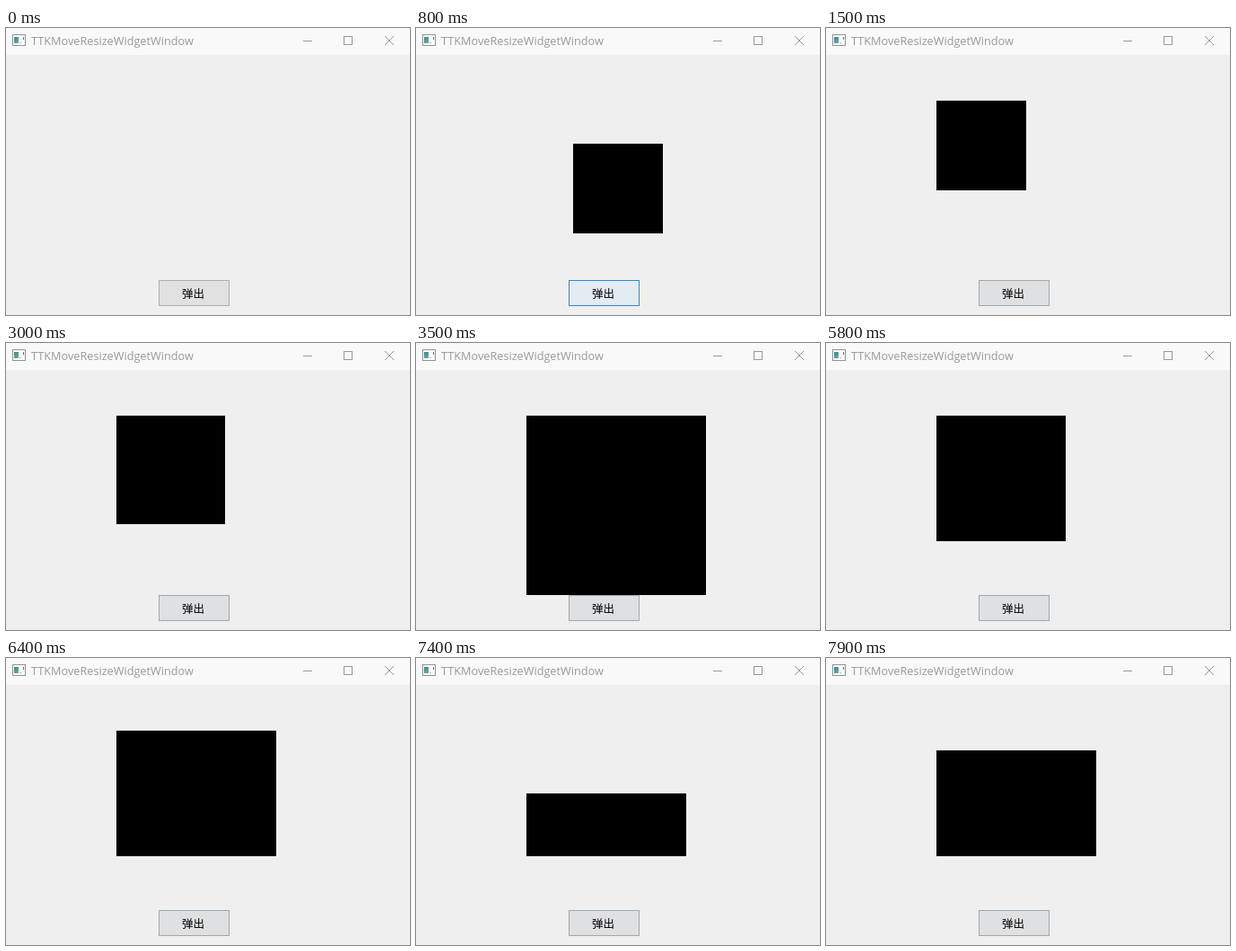
These frames come from a looping animation (450 by 320 pixels, 8000 ms). An HTML page with a canvas:

```html
<!DOCTYPE html>
<html lang="zh">
<head>
<meta charset="utf-8">
<title>TTKMoveResizeWidgetWindow</title>
<style>
  html, body { margin: 0; width: 100%; height: 100%; overflow: hidden; background: #efefef; }
  canvas { display: block; }
</style>
</head>
<body>
<canvas id="stage" width="450" height="320"></canvas>
<script>
const ctx = document.getElementById('stage').getContext('2d');
const LOOP = 8000, STEP = 100;
const SHOWN = 800, PRESSED = 600, MIN_SIZE = 50, MAX_SIZE = 200;

const start = { left: 175, top: 129, right: 275, bottom: 229 };

// Mouse drags: each one eases some edges of the popup to a new place.
const drags = [
  { from: 1100, to: 1500, left: 123, top: 81, right: 223, bottom: 181 },
  { from: 2800, to: 3400, right: 123 + MAX_SIZE, bottom: 81 + MAX_SIZE },
  { from: 3500, to: 4000, bottom: 81 + MIN_SIZE },
  { from: 3550, to: 4300, right: 204 },
  { from: 4300, to: 4800, right: 291, bottom: 221 },
  { from: 5700, to: 6000, right: 174 },
  { from: 6100, to: 6400, right: 301 },
  { from: 7200, to: 7500, top: 169 },
  { from: 7700, to: 7800, bottom: 169 + MIN_SIZE },
  { from: 7800, to: 7900, top: 103, bottom: 221 }
];

const buttonLook = {
  idle: { face: [225, 225, 225], edge: [173, 173, 173] },
  hover: { face: [229, 241, 251], edge: [0, 120, 215] },
  pressed: { face: [204, 228, 247], edge: [0, 84, 153] },
  rest: { face: [223, 224, 226], edge: [160, 168, 173] }
};

const lerp = (a, b, k) => a + (b - a) * k;
const mix = (a, b, k) => a.map((v, i) => lerp(v, b[i], k));
const ramp = (t, from, to) => Math.min(1, Math.max(0, (t - from) / (to - from)));
const ease = k => k * k * k * (k * (6 * k - 15) + 10);
const rgb = c => `rgb(${c.map(Math.round).join(',')})`;

function fill(color, x, y, w, h) {
  ctx.fillStyle = color;
  ctx.fillRect(x, y, w, h);
}

function drawIcon() {
  fill('#8d9496', 7, 7, 15, 13);
  fill('#fbfbfb', 8, 8, 13, 11);
  const shade = ctx.createLinearGradient(9, 10, 14, 17);
  shade.addColorStop(0, '#3f8295');
  shade.addColorStop(1, '#72ad98');
  fill(shade, 9, 10, 5, 7);
  fill('#b5bdc0', 15, 16, 2, 1);
  fill('#5d7078', 19, 10, 1, 3);
}

function drawTitleBar(active) {
  const ink = active ? '#000000' : '#999999';
  fill('#f9f9f9', 0, 0, 450, 30);
  drawIcon();
  ctx.fillStyle = ink;
  ctx.font = '12.7px "Open Sans", "Noto Sans", sans-serif';
  ctx.textAlign = 'left';
  ctx.fillText('TTKMoveResizeWidgetWindow', 28, 19);

  fill(ink, 331, 14, 10, 1);
  ctx.strokeStyle = ink;
  ctx.lineWidth = 1;
  ctx.strokeRect(376.5, 9.5, 9, 9);
  ctx.beginPath();
  ctx.moveTo(422, 9);
  ctx.lineTo(432, 19);
  ctx.moveTo(432, 9);
  ctx.lineTo(422, 19);
  ctx.stroke();
}

function drawButton(t, pressed) {
  const { idle, hover, rest } = buttonLook;
  const color = part => rgb(pressed
    ? buttonLook.pressed[part]
    : mix(mix(idle[part], hover[part], ramp(t, 200, 500)), rest[part], ramp(t, 700, 1000)));
  fill(color('edge'), 170, 281, 79, 29);
  fill(color('face'), 171, 282, 77, 27);
  ctx.fillStyle = '#000';
  ctx.font = '12.5px "Noto Sans CJK SC", "Noto Sans CJK", sans-serif';
  ctx.textAlign = 'center';
  ctx.fillText('弹出', 208.5, 300.5);
}

function popupAt(t) {
  const box = { ...start };
  for (const { from, to, ...goal } of drags) {
    const k = ease(ramp(t, from, to));
    for (const edge in goal) box[edge] = lerp(box[edge], goal[edge], k);
  }
  return box;
}

function drawPopup(t) {
  const box = popupAt(t);
  const left = Math.ceil(box.left), top = Math.ceil(box.top);
  fill('#000', left, top, Math.ceil(box.right) - left, Math.ceil(box.bottom) - top);
}

function render() {
  const t = Math.floor(performance.now() % LOOP / STEP) * STEP;
  const pressed = t >= PRESSED && t < SHOWN;
  fill('#efefef', 0, 0, 450, 320);
  drawTitleBar(pressed);
  drawButton(t, pressed);
  if (t >= SHOWN) drawPopup(t);
  requestAnimationFrame(render);
}
render();
</script>
</body>
</html>
```
